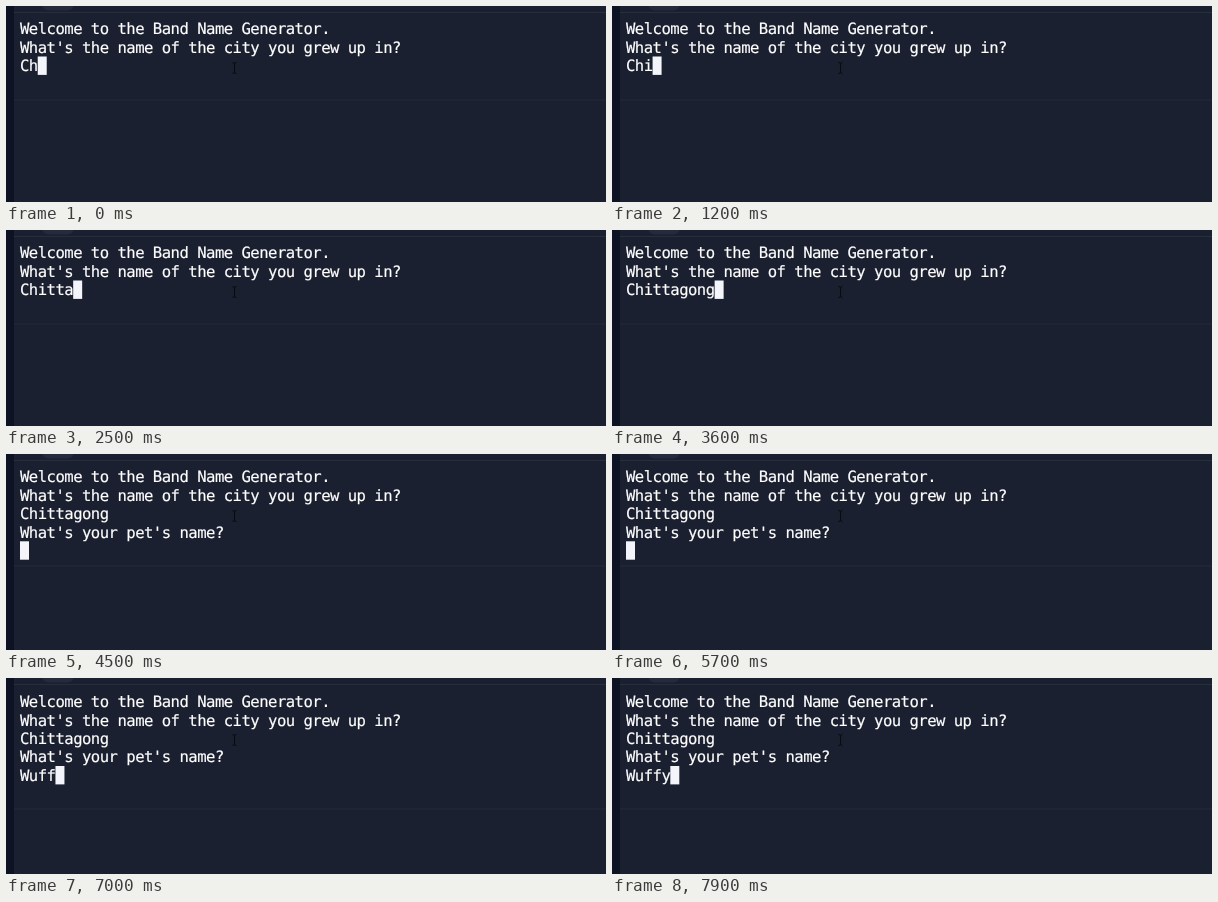
Animation, 600 px wide and 196 px high, one loop 8000 ms. Source, as an HTML page:

```html
<!DOCTYPE html>
<html lang="en">
<head>
<meta charset="utf-8">
<style>
  html, body { margin: 0; width: 100%; height: 100%; overflow: hidden; background: #1b2030; }
  svg { display: block; }
  text {
    font: 15.6px "DejaVu Sans Mono", monospace;
    letter-spacing: -0.53px; /* terminal cells are narrower than the glyph advance */
    fill: #fff; stroke: #fff; stroke-width: 0.2px;
    white-space: pre; text-rendering: geometricPrecision;
  }
</style>
</head>
<body>
<svg id="stage" width="600" height="196" viewBox="0 0 600 196">
  <rect width="600" height="196" fill="#1b2030"/>
  <rect width="8" height="196" fill="#0d1224"/>
  <rect x="36" y="-10" width="32" height="14.5" rx="7" fill="#262b3b"/>
  <rect x="8" y="6" width="592" height="1" fill="#292e3e"/>
  <rect id="divider" x="8" width="592" height="1" fill="#262b3b"/>
  <g id="lines"></g>
  <rect id="caret" width="9" height="18.4" fill="#f3f5fb"/>
  <path d="M226.5 56.5q2 0 2 1.5q0-1.5 2-1.5M228.5 58v8M226.5 67.5q2 0 2-1.5q0 1.5 2 1.5" fill="none" stroke="#080a12"/>
</svg>
<script>
const LOOP = 8000, LEFT = 14, PITCH = 18.4, ADVANCE = 8.862;
const ENTER = 4300, PET_START = 6000;
const CITY = "Chittagong", PET = "Wuffy";
// Time at which each further letter appears; the loop opens with "Ch".
const cityKeys = [0, 0, 1000, 1400, 1700, 2000, 2800, 2850, 2900, 3600];
const petKeys = [PET_START, 6300, 6600, 6900, 7200];

const $ = id => document.getElementById(id);
const rows = Array.from({ length: 5 }, () => {
  const row = document.createElementNS("http://www.w3.org/2000/svg", "text");
  row.setAttribute("x", LEFT);
  return $("lines").appendChild(row);
});

const typed = (word, keys, t) => word.slice(0, keys.filter(k => k <= t).length);

function draw(now) {
  const t = now % LOOP;
  const shift = t >= PET_START ? 0.7 : 0;
  const content = [
    "Welcome to the Band Name Generator.",
    "What's the name of the city you grew up in?",
    typed(CITY, cityKeys, t)
  ];
  if (t >= ENTER) content.push("What's your pet's name?", typed(PET, petKeys, t));

  rows.forEach((row, i) => {
    row.textContent = content[i] || "";
    row.setAttribute("y", 28.4 + i * PITCH + shift);
  });
  const last = content.length - 1;
  $("caret").setAttribute("x", LEFT + content[last].length * ADVANCE);
  $("caret").setAttribute("y", 50.5 + (last - 2) * PITCH + shift);
  $("divider").setAttribute("y", t >= PET_START ? 130.5 : t >= ENTER ? 111.5 : 93.5);
  requestAnimationFrame(draw);
}
draw(performance.now());
</script>
</body>
</html>
```
